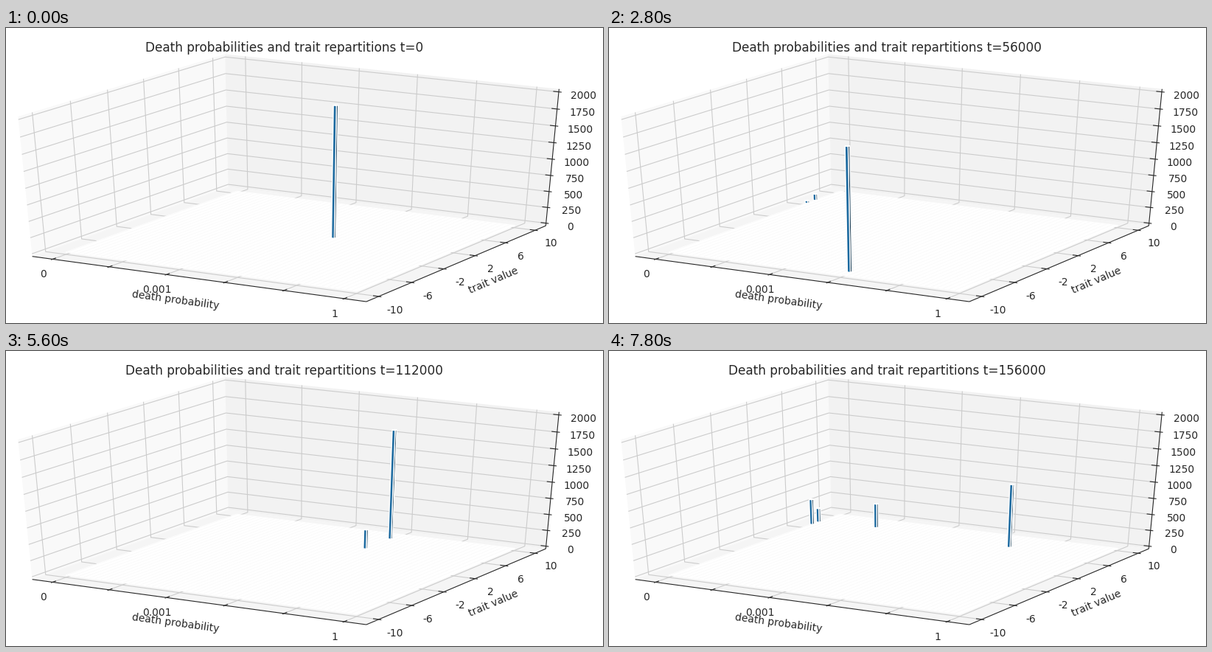
These frames come from a looping animation (810x400 px, 8 s). A matplotlib script:

```python
import numpy as np
import matplotlib.pyplot as plt
from matplotlib.animation import FuncAnimation
from matplotlib.collections import LineCollection, PolyCollection

W, H, DPI = 810, 400, 100
FRAMES, INTERVAL, STEP = 40, 200, 4000

INK, GRID, SEAM = "#262626", "#cccccc", "#f9f9f9"
FRONT, SIDE, TOP = "#1b699f", "#0d324b", "#185b8a"

# Camera around the unit cube: elevation 30, azimuth -60, distance 10
ELEV, AZIM, DIST = np.radians(30), np.radians(-60), 10
TOWARD = np.array([np.cos(AZIM) * np.cos(ELEV),
                   np.sin(AZIM) * np.cos(ELEV), np.sin(ELEV)])
RIGHT = np.array([-np.sin(AZIM), np.cos(AZIM), 0])
UP = np.cross(TOWARD, RIGHT)

LO, HI = -1 / 48, 1 + 1 / 48          # cube with its margin
IN, OUT = 0.2 / 12, 0.1 / 12          # tick length inside and outside
TICK_PAD, NAME_PAD = 0.05, 0.1058
CELL, START = 1 / 110, 1 / 22         # bar grid on the floor
TICKS = START + np.arange(6) / 5.5
Z_TICKS = np.linspace(0, 1, 9)

# Population at a few moments: (probability column, trait row, percent)
MOMENTS = {
    0: [(60, 56, 100)],
    5: [(40, 61, 63), (60, 56, 4), (70, 56, 31)],
    14: [(60, 4, 93), (0, 79, 2), (0, 84, 5)],
    20: [(60, 0, 100)],
    28: [(60, 92, 84), (60, 76, 15)],
    35: [(50, 87, 60), (40, 84, 11), (60, 87, 16), (70, 83, 13)],
    39: [(70, 84, 49), (0, 82, 20), (0, 86, 11), (20, 88, 19)],
}


def project(x, y, z):
    d = np.array([x, y, z]) - 0.5
    depth = DIST - TOWARD @ d
    return 389.6 + 5022.6 * (RIGHT @ d) / depth, 197.3 - 2076.8 * (UP @ d) / depth


def path(*points):
    return [project(*p) for p in points]


fig = plt.figure(figsize=(W / DPI, H / DPI), dpi=DPI, facecolor="white")
ax = fig.add_axes([0, 0, 1, 1])
ax.set_xlim(0, W)
ax.set_ylim(H, 0)
ax.axis("off")


def add_lines(lines, color, width, order):
    ax.add_collection(LineCollection(lines, colors=color, linewidths=width, zorder=order))


def add_label(point, text, **style):
    x, y = project(*point)
    ax.text(x, y, text, color=INK, fontsize=10, ha="center", **style)


def slope(a, b):
    (x0, y0), (x1, y1) = path(a, b)
    return np.degrees(np.arctan2(y0 - y1, x1 - x0))


def draw_room():
    panes = [
        path((LO, LO, LO), (LO, HI, LO), (LO, HI, HI), (LO, LO, HI)),
        path((LO, HI, LO), (HI, HI, LO), (HI, HI, HI), (LO, HI, HI)),
        path((LO, LO, LO), (HI, LO, LO), (HI, HI, LO), (LO, HI, LO)),
    ]
    ax.add_collection(PolyCollection(
        panes, facecolors=["#f9f9f9", "#f2f2f2", "#f5f5f5"],
        edgecolors="none", zorder=1))

    grid = [path((t, LO, LO), (t, HI, LO), (t, HI, HI)) for t in TICKS]
    grid += [path((HI, t, LO), (LO, t, LO), (LO, t, HI)) for t in TICKS]
    grid += [path((LO, LO, t), (LO, HI, t), (HI, HI, t)) for t in Z_TICKS]
    add_lines(grid, GRID, 0.8, 2)

    axes = [path((LO, LO, LO), (HI, LO, LO)),
            path((HI, LO, LO), (HI, HI, LO)),
            path((HI, HI, LO), (HI, HI, HI))]
    axes += [path((t, LO + IN, LO), (t, LO - OUT, LO)) for t in TICKS]
    axes += [path((HI - IN, t, LO), (HI + OUT, t, LO)) for t in TICKS]
    axes += [path((HI - IN, HI, t), (HI + OUT, HI, t)) for t in Z_TICKS]
    add_lines(axes, INK, 0.8, 3)


def draw_labels():
    low, high = LO - TICK_PAD, HI + TICK_PAD
    for t, text in zip(TICKS, ["0", "", "0.001", "", "", "1"]):
        add_label((t, low, low), text, va="top")
    for k, t in enumerate(TICKS):
        add_label((high, t, low), str(4 * k - 10), va="top")
    for k, t in enumerate(Z_TICKS):
        add_label((high, high, t), str(250 * k), va="top")
    low, high = LO - NAME_PAD, HI + NAME_PAD
    add_label((0.5, low, low), "death probability", va="center",
              rotation=slope((LO, LO, LO), (HI, LO, LO)))
    add_label((high, 0.5, low), "trait value", va="center",
              rotation=slope((HI, LO, LO), (HI, HI, LO)))


def draw_floor():
    a, b = START, 1 - START
    ax.add_collection(PolyCollection(
        [path((a, a, 0), (b, a, 0), (b, b, 0), (a, b, 0))],
        facecolors="white", edgecolors="white", linewidths=1, zorder=4))
    seams = [path((x, a, 0), (x, b, 0)) for x in a + CELL * np.arange(0.5, 100, 2)]
    add_lines(seams, SEAM, 0.5, 5)


def blend(old, new, s):
    """Bars sharing a column drift; the others shrink away or grow."""
    bars, fresh = [], list(new)
    for col, row, share in old:
        twin = next((b for b in fresh if b[0] == col), None)
        if twin:
            fresh.remove(twin)
            bars.append((col, round(row + (twin[1] - row) * s),
                         share + (twin[2] - share) * s))
        else:
            bars.append((col, row, share * (1 - s)))
    return bars + [(col, row, share * s) for col, row, share in fresh]


def bars_at(frame):
    times = list(MOMENTS)
    k = min(np.searchsorted(times, frame, side="right"), len(times) - 1)
    t0, t1 = times[k - 1], times[k]
    s = (frame - t0) / (t1 - t0)
    bars = blend(MOMENTS[t0], MOMENTS[t1], s * s * (3 - 2 * s))
    # far bars first
    return sorted((b for b in bars if b[2] > 0.2),
                  key=lambda b: TOWARD[0] * b[0] + TOWARD[1] * b[1])


def bar_faces(col, row, share):
    x0, y0, z = START + col * CELL, START + row * CELL, share / 100
    x1, y1 = x0 + CELL, y0 + CELL
    return [path((x0, y0, z), (x1, y0, z), (x1, y1, z), (x0, y1, z)),
            path((x1, y0, 0), (x1, y1, 0), (x1, y1, z), (x1, y0, z)),
            path((x0, y0, 0), (x1, y0, 0), (x1, y0, z), (x0, y0, z))]


draw_room()
draw_labels()
draw_floor()
bars = PolyCollection([], edgecolors="white", linewidths=1, zorder=6)
ax.add_collection(bars)
title = ax.text(377.2, 32.2, "", color=INK, fontsize=12.12, ha="center", va="baseline")


def update(frame):
    current = bars_at(frame)
    bars.set_verts([face for bar in current for face in bar_faces(*bar)])
    bars.set_facecolor([TOP, SIDE, FRONT] * len(current))
    title.set_text(f"Death probabilities and trait repartitions t={frame * STEP}")
    return bars, title


anim = FuncAnimation(fig, update, frames=FRAMES, interval=INTERVAL, repeat=True)
plt.show()
```
